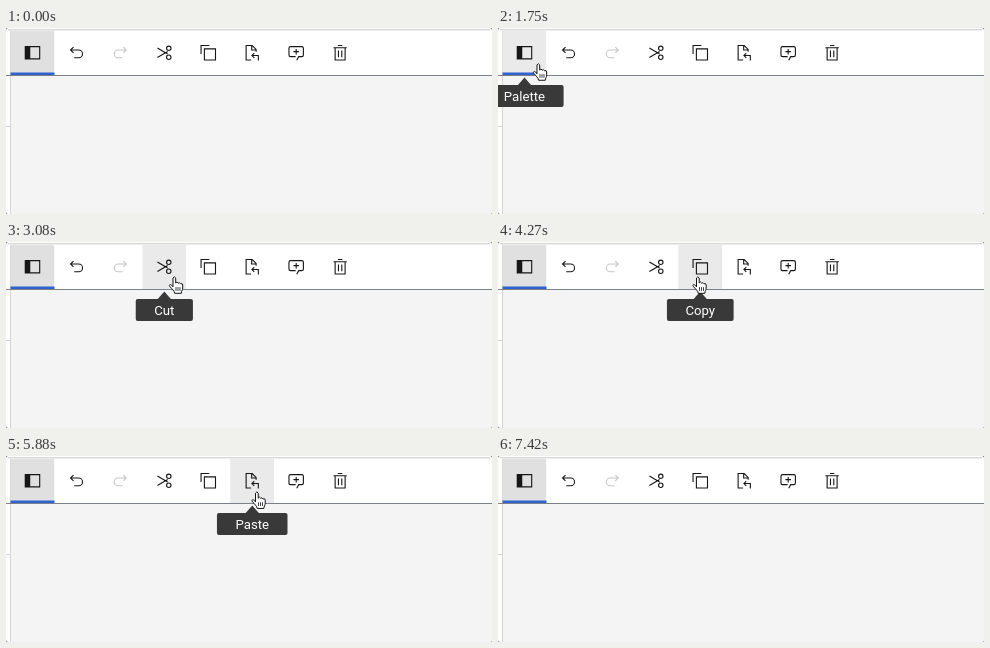
Write an HTML page that moves like this. It is 486 px wide and 186 px high and loops after 7630 ms.

```html
<!DOCTYPE html>
<html lang="en">
<head>
<meta charset="utf-8">
<title>Toolbar tooltips</title>
<style>
  html, body { margin: 0; width: 100%; height: 100%; overflow: hidden; background: #777; }
  svg { display: block; }
  text { font: 13.2px Roboto, Arial, sans-serif; fill: #fff; text-anchor: middle; }
</style>
</head>
<body>
<svg width="486" height="186" viewBox="0 0 486 186">
  <rect width="486" height="186" rx="2.5" fill="#fff"/>
  <path d="M5 48H486V183.5a2.5 2.5 0 0 1-2.5 2.5H5Z" fill="#f4f4f4"/>
  <path d="M2 1.8H484" stroke="#c6c6c6"/>
  <path d="M4.5 3V186M0 98.5H4" stroke="#d4d4d4"/>
  <g id="buttons"></g>
  <path d="M0 47.5H486" stroke="#7c8087"/>
  <rect x="4.5" y="44.5" width="44" height="2.5" fill="#2f62d0"/>
  <g id="tip">
    <path d="M-7 57.5L0 49.5L7 57.5Z" fill="#393939"/>
    <rect id="box" y="57" height="22" rx="2" fill="#393939"/>
    <text id="label" y="72.6"></text>
  </g>
  <g id="hand" fill="#fff" stroke="#111" stroke-linejoin="round" stroke-linecap="round">
    <path d="M4.5 10.5V2Q5.8-.5 7.2 2V7Q8.5 5 9.7 7.2Q11 5.8 12 7.8Q14.2 7 14.2 9V12C14.2 14.5 12.8 15 12.8 17.3H6.2C6 15 3.5 13 1.2 10.3C.2 8.8 2 7.9 3 9Z"/>
    <path d="M7.5 11.5v3m2-3v3m2-3v3" stroke-width=".8"/>
  </g>
  <path id="arrow" d="M.5.5V14L3.6 11.1L5.8 16.2L8 15.2L5.8 10.3H10.2Z" fill="#111" stroke="#fff"/>
</svg>
<script>
const LOOP = 7630, STEP = 70;
const LEFT = 4.5, PITCH = 43.95, BAR_BOTTOM = 47, REST_Y = 34;
const $ = id => document.getElementById(id);

// Icons are stroked on a 32-unit grid.
const tools = [
  { label: 'Palette', icon: 'M3 5H29V27H3ZM5 5V27M7 5V27M9 5V27M11 5V27' },
  { label: 'Undo: Move nodes', icon: 'M10.7 5.7L5.4 11L10.7 16.3M5.4 11H20a7 7 0 0 1 0 14H12' },
  { label: 'Redo', icon: 'M21.3 5.7L26.6 11L21.3 16.3M26.6 11H12a7 7 0 0 0 0 14H20', disabled: true },
  { label: 'Cut', icon: 'M20 8a4 4 0 1 0 8 0a4 4 0 1 0-8 0M20 24a4 4 0 1 0 8 0a4 4 0 1 0-8 0M3.5 7.5L22 18.2M3.5 24.5L22 13.8' },
  { label: 'Copy', icon: 'M9 9H29V29H9ZM3 18V3H18' },
  { label: 'Paste', icon: 'M14 29H5V3H16L23 10V14M15 3V11H23M27 30V21H15.5M19.7 16.7L15.4 21L19.7 25.3' },
  { label: 'New comment', icon: 'M15 23H6a3 3 0 0 1-3-3V8a3 3 0 0 1 3-3H26a3 3 0 0 1 3 3V20a3 3 0 0 1-3 3H20.5L17 29.5M11 14H21M16 9V19' },
  { label: 'Delete', icon: 'M4 7H28M7 7V29H25V7M12 3H20M13 12V24M19 12V24' }
];

// Places where the pointer pauses.
const stops = [
  { arrive: 0, leave: 0, x: 130, y: 190 },
  { arrive: 280, leave: 490, x: 117, y: 166 },
  { arrive: 1260, leave: 1680, x: 30 },
  { arrive: 2030, leave: 2730, x: 73 },
  { arrive: 3080, leave: 3850, x: 162.5 },
  { arrive: 4270, leave: 4690, x: 194 },
  { arrive: 5040, leave: 5810, x: 240 },
  { arrive: 6300, leave: 7000, x: 331 },
  { arrive: 7420, leave: LOOP, x: 250, y: 190 }
];

$('buttons').innerHTML = tools.map(({ icon, disabled }, i) =>
  `<g transform="translate(${LEFT + PITCH * i} 0)">
     <rect y="3" width="${PITCH}" height="44"/>
     <path transform="translate(13.1 15.9) scale(.555)" d="${icon}" fill="none"
       stroke="${disabled ? '#c6c6c6' : '#161616'}" stroke-width="2"/>
   </g>`).join('');
const backs = document.querySelectorAll('#buttons rect');

const ease = k => k * k * (3 - 2 * k);

// Eased travel between stops, sagging a little on the way.
function pointerAt(t) {
  const i = Math.max(1, stops.findIndex(s => s.leave > t));
  const from = stops[i - 1], to = stops[i];
  const k = ease(Math.min(1, Math.max(0, (t - from.leave) / (to.arrive - from.leave))));
  const y0 = from.y ?? REST_Y, y1 = to.y ?? REST_Y, dx = to.x - from.x;
  const sag = .24 * Math.abs(dx) * k * (1 - k);
  return { x: from.x + dx * k, y: y0 + (y1 - y0) * k + sag };
}

function toolUnder({ x, y }) {
  const i = Math.floor((x + 5 - LEFT) / PITCH);
  return y < BAR_BOTTOM && tools[i] && !tools[i].disabled ? i : -1;
}

function show(id, visible) { $(id).style.display = visible ? '' : 'none'; }

function draw(t) {
  const hovered = toolUnder(pointerAt(t - STEP));
  backs.forEach((back, i) =>
    back.setAttribute('fill', i === hovered ? '#eaeaea' : i ? '#fff' : '#e0e0e0'));

  show('tip', hovered >= 0);
  if (hovered >= 0) {
    $('tip').setAttribute('transform', `translate(${LEFT + PITCH * (hovered + .5)} 0)`);
    $('label').textContent = tools[hovered].label;
    const width = $('label').getComputedTextLength() + 37;
    $('box').setAttribute('x', -width / 2);
    $('box').setAttribute('width', width);
  }

  const { x, y } = pointerAt(t);
  show('hand', y < BAR_BOTTOM);
  show('arrow', y >= BAR_BOTTOM);
  for (const id of ['hand', 'arrow']) $(id).setAttribute('transform', `translate(${x} ${y})`);
}

const start = performance.now();
function tick() {
  const t = (performance.now() - start) % LOOP;
  draw(Math.floor(t / STEP) * STEP);
  requestAnimationFrame(tick);
}
tick();
</script>
</body>
</html>
```
